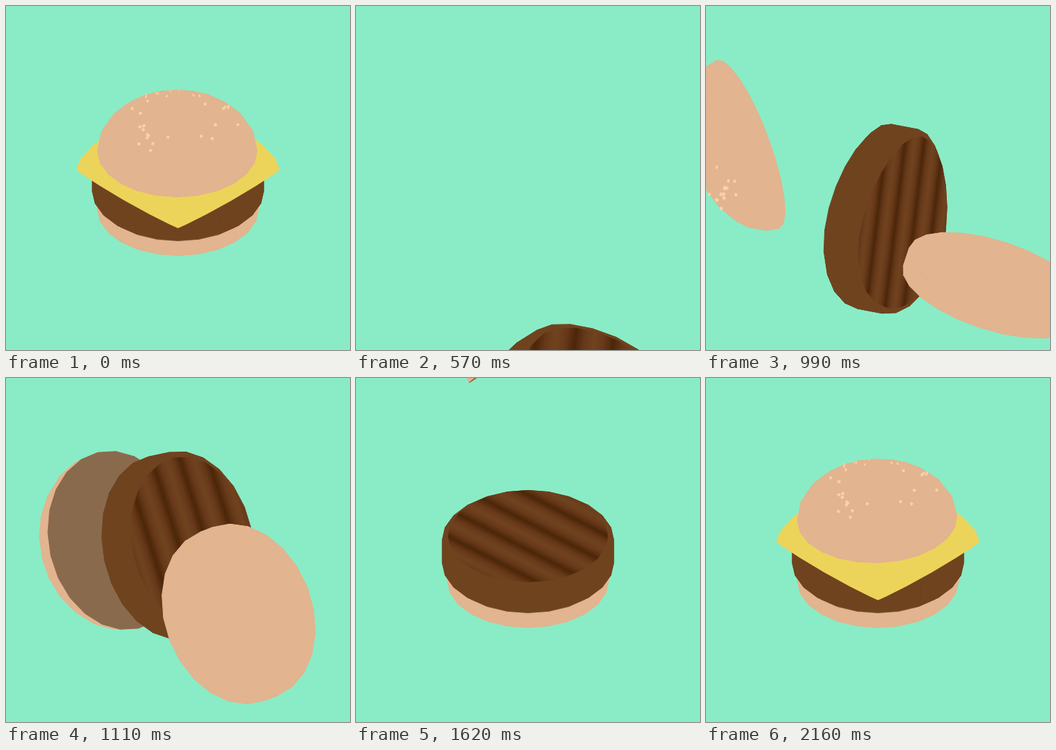
Write an HTML page that moves like this. It is 500 by 500 pixels and loops after 2.19 s.

```html
<!DOCTYPE html>
<html lang="en">
<head>
<meta charset="utf-8">
<title>Burger</title>
<style>
  html, body { margin: 0; width: 100%; height: 100%; overflow: hidden; background: #89ecc6; }
  svg { display: block; width: 100%; height: 100%; }
</style>
</head>
<body>
<svg viewBox="0 0 500 500">
  <defs>
    <linearGradient id="grill" gradientUnits="userSpaceOnUse" spreadMethod="reflect" x1="0" y1="0" x2="0" y2="26">
      <stop offset="0" stop-color="#70431f"/>
      <stop offset=".5" stop-color="#67391a"/>
      <stop offset="1" stop-color="#4b2608"/>
    </linearGradient>
  </defs>
  <g id="stage"></g>
</svg>
<script>
const LOOP = 2190, STEP = 30, ENTER = 570, SIDES = 24;
const BUN = '#e2b48f', CRUMB = '#8a6a4d', MEAT = '#70431f', CHEESE = '#ecd45a', SEED = '#fbd1a6';
const DOME_R = 116, DOME_H = 72, SLICE_R = 148;
const rad = d => d * Math.PI / 180;
const range = (n, f) => Array.from({ length: n }, (_, i) => f(i));
const stage = document.getElementById('stage');
const grill = document.getElementById('grill');

// Direction of the up axis on screen and its angle from the viewer
const REST = [270, 55], NEAR = [275, 55];

// Key poses: time, x, y, scale, direction, tilt, twist
const moves = {
  bottom: [
    [840, 534, 502, 1.15, 45, 55],
    [1110, 338, 343, 1.12, 159, 138],
    [1380, 248, 295, 1, ...NEAR],
    [1620, 250, 285, 1, ...REST]
  ],
  patty: [
    [840, 286, 421, 1.1, 248, 78, -15],
    [1110, 250, 243, 1.08, 168, 134, 0],
    [1380, 250, 249, 1, ...NEAR, 0],
    [1620, 250, 252, 1, ...REST, 0]
  ],
  cheese: [
    [1680, 250, -130, .96, 212, 95],
    [1890, 250, 127, .96, 231, 76],
    [2130, 250, 238, 1, ...REST]
  ],
  top: [
    [840, -89, 137, 1.1, 167, -45],
    [1110, 163, 236, 1.13, 167, 140],
    [1380, 267, 204, 1.08, ...NEAR],
    [1680, 258, -110, 1.03, 222, 102],
    [1890, 241, -60, 1.02, 195, 129],
    [2190, 249, 211, 1, ...REST]
  ]
};

// Smooth curve through the key poses: straight before the first, at rest after the last
function poseAt(list, t) {
  const last = list.length - 1;
  const slope = (n, c) => {
    if (n === last) return 0;
    const a = list[Math.max(n - 1, 0)], b = list[n + 1];
    return (b[c] - a[c]) / (b[0] - a[0]);
  };
  if (t >= list[last][0]) return list[last].slice(1);
  if (t <= list[0][0]) return list[0].map((v, c) => v + slope(0, c) * (t - list[0][0])).slice(1);
  const i = list.findIndex(k => k[0] > t) - 1;
  const a = list[i], b = list[i + 1], d = b[0] - a[0], u = (t - a[0]) / d, v = 1 - u;
  return a.map((from, c) => from * (1 + 2 * u) * v * v + b[c] * u * u * (3 - 2 * u)
    + d * (slope(i, c) * u * v * v - slope(i + 1, c) * u * u * v)).slice(1);
}

function axes(dir, tilt) {
  const cd = Math.cos(dir), sd = Math.sin(dir), ct = Math.cos(tilt), st = Math.sin(tilt);
  return [-sd, cd, -ct * cd, -ct * sd, st * cd, st * sd];
}

function projector([x, y, scale, dir, tilt, twist = 0]) {
  return ([a, b, h]) => {
    const m = axes(rad(dir), rad(tilt + twist * a / 125));
    return [x + scale * (a * m[0] + b * m[2] + h * m[4]), y + scale * (a * m[1] + b * m[3] + h * m[5])];
  };
}

const around = f => range(SIDES, i => f(2 * Math.PI * i / SIDES));
const ring = (r, h) => around(w => [r * Math.cos(w), r * Math.sin(w), h]);

const outline = pts => 'M' + pts.map(p => p[0].toFixed(2) + ' ' + p[1].toFixed(2)).join('L') + 'Z';

// All faces wind the same way so that they merge into one shape
function wound(pts) {
  const area = pts.reduce((sum, p, i) => {
    const q = pts[(i + 1) % pts.length];
    return sum + p[0] * q[1] - p[1] * q[0];
  }, 0);
  return outline(area < 0 ? pts.reverse() : pts);
}

function addElement(parent, tag, attrs = {}) {
  const el = document.createElementNS('http://www.w3.org/2000/svg', tag);
  for (const k in attrs) el.setAttribute(k, attrs[k]);
  return parent.appendChild(el);
}

function makePiece(name, color, rings, topFill, bottomFill) {
  const group = addElement(stage, 'g');
  const body = addElement(group, 'path', { fill: color, stroke: color, 'stroke-linejoin': 'round' });
  const cap = addElement(group, 'path');
  return { name, group, body, cap, rings, topFill, bottomFill };
}

const domeRings = range(8, i => {
  const w = Math.PI / 2 * i / 7;
  return ring(DOME_R * Math.cos(w), DOME_H * Math.sin(w));
});
const pattyRings = [ring(116, -27), ring(124.6, -20), ring(124.6, 20), ring(116, 27)];
const bottom = makePiece('bottom', BUN, [ring(117, -13), ring(117, 13)], CRUMB, BUN);
const patty = makePiece('patty', MEAT, pattyRings, 'url(#grill)', 'url(#grill)');
const cheese = addElement(stage, 'path', { fill: CHEESE });
const bunTop = makePiece('top', BUN, domeRings, 'none', CRUMB);
const seedPath = addElement(bunTop.group, 'path', { fill: 'none', stroke: SEED, 'stroke-linecap': 'round' });

// A diamond whose rear edges bulge where they bend over the patty
const slice = around(w => {
  const c = Math.cos(w), s = Math.sin(w), power = 2 / (s > 0 ? 1.08 : 1.6);
  const soft = v => SLICE_R * Math.sign(v) * Math.abs(v) ** power;
  return [soft(c), soft(s), 0];
});

let seedState = 7;
const random = () => (seedState = seedState * 16807 % 2147483647) / 2147483647;
const seeds = range(32, () => ({ turn: 2 * Math.PI * random(), fall: .4 + .5 * random() }));

const onDome = (turn, fall) => [
  DOME_R * Math.sin(fall) * Math.cos(turn), DOME_R * Math.sin(fall) * Math.sin(turn), DOME_H * Math.cos(fall)
];

function drawPiece(piece, t) {
  const pose = poseAt(moves[piece.name], t), project = projector(pose);
  const rows = piece.rings.map(r => r.map(project));
  const faces = rows.slice(1).flatMap((row, k) => range(SIDES, i => {
    const j = (i + 1) % SIDES;
    return wound([rows[k][i], rows[k][j], row[j], row[i]]);
  }));
  piece.body.setAttribute('d', faces.join(''));
  const up = Math.cos(rad(pose[4])) > 0, fill = up ? piece.topFill : piece.bottomFill;
  piece.cap.setAttribute('d', outline(up ? rows[rows.length - 1] : rows[0]));
  piece.cap.setAttribute('fill', fill);
  piece.cap.setAttribute('stroke', fill);
  return { pose, project, up };
}

function drawGrill({ pose, project, up }) {
  const [, , scale, dir, tilt] = pose;
  const m = axes(rad(dir), rad(tilt)).slice(0, 4).map(v => v * scale);
  const center = project([0, 0, up ? 27 : -27]);
  const matrix = [...m, ...center].map(v => v.toFixed(4));
  grill.setAttribute('gradientTransform', `matrix(${matrix}) rotate(${up ? 42 : 8})`);
}

function drawSeeds({ pose, project }) {
  const c = Math.cos(rad(pose[4])), s = Math.sin(rad(pose[4]));
  const visible = seeds.filter(({ turn, fall }) => {
    const [, b, h] = onDome(turn, fall);
    return b * s / DOME_R ** 2 + h * c / DOME_H ** 2 > 0;
  });
  seedPath.setAttribute('d', visible.map(({ turn, fall }) =>
    outline([-.021, .021].map(half => project(onDome(turn, fall + half))))).join(''));
  seedPath.setAttribute('stroke-width', 4 * pose[2]);
}

let wasUp = true;
function render(t) {
  const leaving = t < ENTER, time = leaving ? LOOP : t;
  const lift = leaving ? 196 * (t / 240) ** 1.75 : 0;
  stage.setAttribute('transform', `translate(0 ${-lift})`);
  drawPiece(bottom, time);
  const meat = drawPiece(patty, time);
  drawGrill(meat);
  drawSeeds(drawPiece(bunTop, time));
  cheese.setAttribute('d', outline(slice.map(projector(poseAt(moves.cheese, time)))));
  // The stack is seen from below while the patty faces away
  if (meat.up !== wasUp) {
    const order = [bottom.group, patty.group, cheese, bunTop.group];
    stage.append(...(meat.up ? order : order.reverse()));
    wasUp = meat.up;
  }
}

const start = performance.now();
function tick() {
  const t = (performance.now() - start) % LOOP;
  render(Math.floor(t / STEP) * STEP);
  requestAnimationFrame(tick);
}
tick();
</script>
</body>
</html>
```
